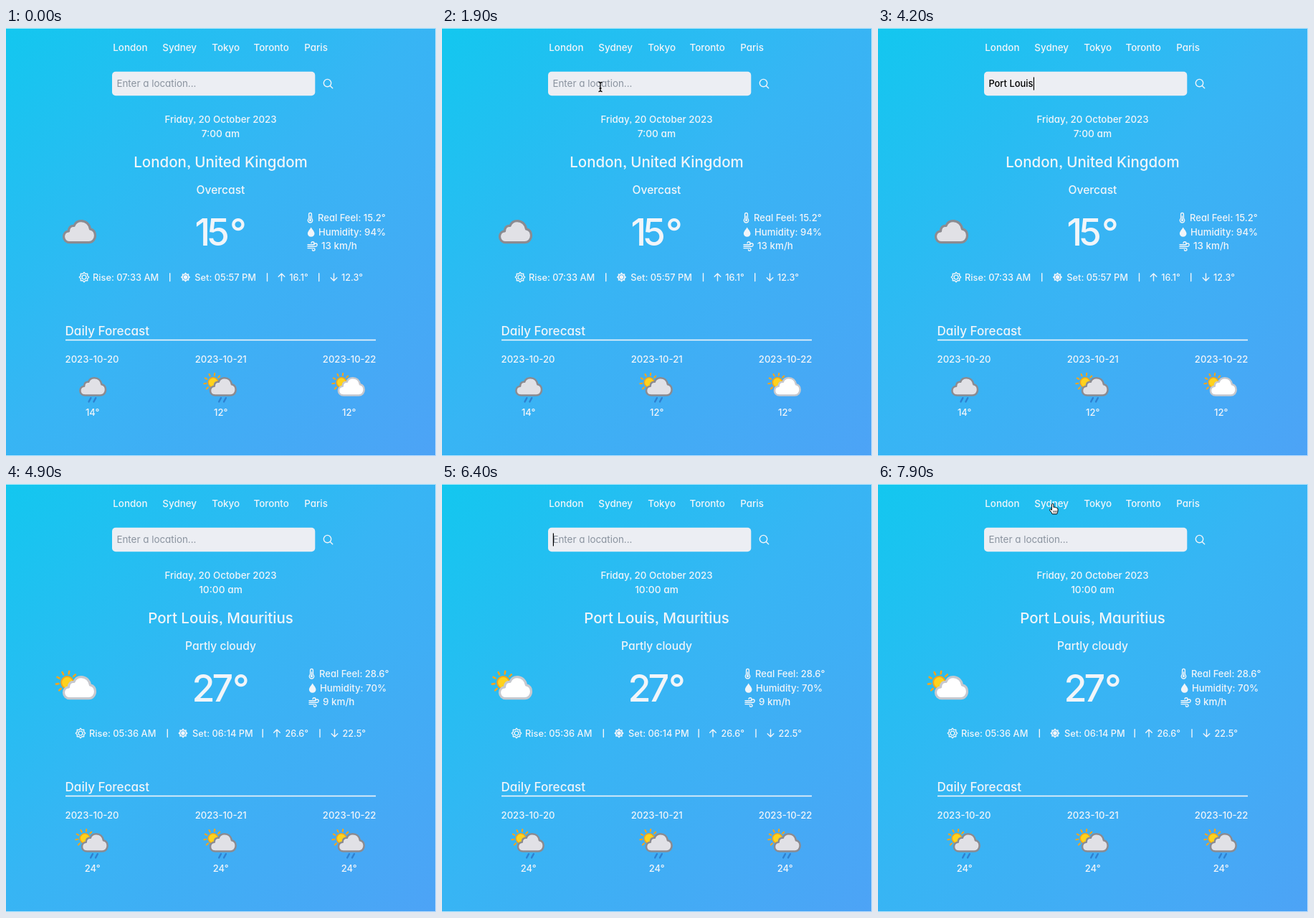
Write an HTML page that moves like this. It is 600 px wide and 596 px high and loops after 8000 ms.

```html
<!DOCTYPE html>
<html lang="en">
<head>
<meta charset="utf-8">
<title>Weather</title>
<style>
  html, body { margin: 0; width: 100%; height: 100%; overflow: hidden; }
  body { background: linear-gradient(135deg, #13c7ef, #37b5f4 48%, #4da3f6); }
  svg { display: block; width: 600px; height: 596px; }
  text {
    font: 500 13.4px Inter, "Open Sans", sans-serif;
    font-feature-settings: "cv11", "ss03";
    fill: #f1f5f9;
    white-space: pre;
  }
  .line { fill: none; stroke: #f1f5f9; stroke-width: 1.4; stroke-linecap: round; stroke-linejoin: round; }
  .solid { fill: #f1f5f9; }
  .cloud { stroke-width: 3.2; stroke-linejoin: round; }
  .grey { fill: #e1e1e6; stroke: #8b8b91; }
  .white { fill: #fff; stroke: #c6c8ce; }
  .rain { stroke: #2f80d0; stroke-width: 2.9; fill: none; stroke-linecap: round; }
  .disc { fill: #ffd21c; stroke: #f3a51f; stroke-width: 2; }
  .ray { stroke: #f3a51f; stroke-width: 2.6; stroke-linecap: round; }
  .edge { fill: none; stroke: #fff; stroke-opacity: .65; }
  #degrees text { font-weight: 400; }
  #hint { fill: #8a939f; font-weight: 400; }
  #typed { fill: #000; }
</style>
</head>
<body>
<svg id="stage" viewBox="0 0 600 596"></svg>
<script>
const LOOP = 8000;
const CLOUD = 'M8.5 30C3.5 30 0 26.5 0 22C0 17.5 3 14.5 7 14.2C7 9 10 6.5 14.5 6.8C16 2.5 20 0 24.5 0' +
  'C31 0 36 4.5 37 11.3C41.5 12.3 44 16 44 20.5C44 26 40 30 35 30Z';

const text = (x, y, s, size = 13.4, anchor = 'start', id = '') =>
  `<text x="${x}" y="${y}" style="font-size:${size}px" text-anchor="${anchor}"${id && ` id="${id}"`}>${s}</text>`;
const mid = (x, y, s, size) => text(x, y, s, size, 'middle');
const at = (x, y, body, scale = 1) => `<g transform="translate(${x} ${y}) scale(${scale})">${body}</g>`;
const path = (d, cls) => `<path class="${cls}" d="${d}"/>`;
const ring = (n, f) => Array.from({ length: n }, (_, i) => f(i)).join('');

// Weather icons
const sun = at(5, 7.8, ring(10, i =>
  `<path class="ray" d="M0-12.2V-15.8" transform="rotate(${i * 36 + 10})"/>`) +
  '<circle class="disc" r="8.4"/>');
const cloud = cls => path(CLOUD, 'cloud ' + cls);
const drops = path('M18.5 34.5L15 41M27 34.5L23.5 41', 'rain');
const ICONS = {
  overcast: cloud('grey'),
  partly: sun + cloud('white'),
  rain: cloud('grey') + drops,
  showers: sun + cloud('grey') + drops
};

// Small line icons
const star = 'M' + Array.from({ length: 16 }, (_, i) => {
  const a = i * Math.PI / 8, r = i % 2 ? 5 : 6.7;
  return (r * Math.sin(a)).toFixed(2) + ' ' + (-r * Math.cos(a)).toFixed(2);
}).join('L') + 'Z';
const rise = path(star, 'line') + '<circle class="line" r="2.9"/>';
const set = path(star, 'solid') + '<circle r="3.3" fill="none" stroke="#45b2f4" stroke-width=".9"/>';
const up = path('M0 5V-5M-4.3-.8L0-5L4.3-.8', 'line');
const down = path('M0-5V5M-4.3 .8L0 5L4.3 .8', 'line');
const thermo = path('M-1.9 1.2V-4.6A1.9 1.9 0 0 1 1.9-4.6V1.2A3.2 3.2 0 1 1-1.9 1.2Z', 'line') +
  path('M0-2V3', 'line') + '<circle class="solid" cy="3.6" r="1.6"/>';
const drop = path('M0-6.5C2 -3 4.8-.6 4.8 2.2A4.8 4.5 0 0 1-4.8 2.2C-4.8-.6-2-3 0-6.5Z', 'solid');
const wind = path('M-6-1.8H1A2 2 0 1 0-1-4M-6 .6H5A2.1 2.1 0 1 0 3-2M-6 3H2A1.8 1.8 0 1 1 .4 5', 'line');

function scene(w) {
  const [sunX, riseX, bar1, setIcon, setX, bar2, upX, hiX, bar3, downX, loX] = w.row;
  const icon = (name, i) => at((name === 'rain' ? 103.4 : 106) + 179 * i, 487.2, ICONS[name], .81);
  return mid(299.5, 152, w.time, 13.7) +
    mid(299.5, 194, w.place, 20.5) +
    mid(299.5, 231, w.sky, 15.6) +
    at(80.5, 268.6, ICONS[w.icon]) +
    `<g id="degrees">${text(w.tempX, 302.6, w.temp, 52)}</g>` +
    at(w.shift, 0,
      at(424.5, 264, thermo) + text(435, 268.8, 'Real Feel: ' + w.feel, 13) +
      at(425.7, 284, drop) + text(436, 288.8, 'Humidity: ' + w.humid, 13.2) +
      at(427, 303.6, wind) + text(440, 308.4, w.wind)) +
    at(sunX, 347, rise) + text(riseX, 351.8, 'Rise: ' + w.rise, 12.8) +
    at(setIcon, 347, set) + text(setX, 351.8, 'Set: ' + w.set, 12.8) +
    [bar1, bar2, bar3].map(x => path(`M${x} 341.8V352.6`, 'line')).join('') +
    at(upX, 347, up) + text(hiX, 351.8, w.hi, 12.6) +
    at(downX, 347, down) + text(loX, 351.8, w.lo, 12.6) +
    w.days.map(([name, t], i) => icon(name, i) + mid(120.7 + 179 * i, 539.6, t, 13)).join('');
}

const london = {
  time: '7:00 am', place: 'London, United Kingdom', sky: 'Overcast', icon: 'overcast',
  temp: '15°', tempX: '263.5 280.5 312', shift: 0, feel: '15.2°', humid: '94%', wind: '13 km/h',
  rise: '07:33 AM', set: '05:57 PM', hi: '16.1°', lo: '12.3°',
  row: [109, 121, 228.7, 250.5, 263.3, 364.5, 384.5, 395.3, 436.7, 457.5, 468],
  days: [['rain', '14°'], ['showers', '12°'], ['partly', '12°']]
};
const portLouis = {
  time: '10:00 am', place: 'Port Louis, Mauritius', sky: 'Partly cloudy', icon: 'partly',
  temp: '27°', tempX: '259.5 287.5 316', shift: 2, feel: '28.6°', humid: '70%', wind: '9 km/h',
  rise: '05:36 AM', set: '06:14 PM', hi: '26.6°', lo: '22.5°',
  row: [104, 116, 225.3, 247, 260, 358.2, 378, 389.5, 438, 458.5, 469.5],
  days: [['showers', '24°'], ['showers', '24°'], ['showers', '24°']]
};

const outline = 'fill="#fff" stroke="#000" stroke-linejoin="round"';
const pointers = {
  beam: '<path d="M-2.5-6.5Q0-6.5 0-4.5Q0-6.5 2.5-6.5M0-4.5V4.5M-2.5 6.5Q0 6.5 0 4.5Q0 6.5 2.5 6.5M-1.5 2H1.5" fill="none" stroke="#000" stroke-width="1.3"/>',
  arrow: `<path d="M0 0V13L3 10.2L5 14.8L7.2 13.8L5.2 9.4H9.2Z" ${outline}/>`,
  hand: `<path d="M-2.6 1V-5.2A1.3 1.3 0 0 1 0-5.2V-1.6Q1.3-2.5 2.3-1.2Q3.6-1.9 4.4-.6Q6-.9 6 .9V3Q6 5.4 4.6 7.8H-1.8Q-2.6 5.8-5.2 2.8Q-5.8 1.4-4.6 1Q-3.6 .8-2.6 2.4Z" ${outline}/><path d="M0 3V6M2 3V6M3.9 3V6" stroke="#000" stroke-width=".7"/>`
};

const $ = id => document.getElementById(id);
const nav = [['London', 149.3], ['Sydney', 218.3], ['Tokyo', 287.3], ['Toronto', 345.5], ['Paris', 416.2]];
$('stage').innerHTML =
  path('M0 .5H599.5V595.5H0', 'edge') +
  nav.map(([s, x]) => text(x, 32, s)).join('') +
  '<rect x="148" y="60.7" width="283.3" height="33.6" rx="5" fill="#eceef3"/>' +
  text(154.4, 82, 'Enter a location...', 13.4, 'start', 'hint') +
  text(154.4, 82, '', 12.9, 'start', 'typed') +
  '<rect id="caret" y="68.5" width="1.2" height="18"/>' +
  at(448.5, 76.6, '<circle class="line" r="5.2"/>' + path('M3.8 3.8L7.2 7.2', 'line')) +
  mid(299.5, 132, 'Friday, 20 October 2023', 13.35) +
  `<g id="before">${scene(london)}</g><g id="after">${scene(portLouis)}</g>`.replaceAll('id="degrees"', 'class="degrees"') +
  text(82.5, 428, 'Daily Forecast', 17.1) +
  '<rect class="solid" x="83" y="433.7" width="433" height="1.6"/>' +
  text(82.6, 466.4, '2023-10-20', 13.1) + mid(299.7, 466.4, '2023-10-21', 13.1) +
  text(516.4, 466.4, '2023-10-22', 13.1, 'end') +
  '<g id="pointer">' + Object.entries(pointers).map(([k, p]) => `<g id="${k}">${p}</g>`).join('') + '</g>';

const WORD = 'Port Louis';
const CLICK = 2000, TYPE = 2650, KEY = 150, ENTER = 4400, LOADED = 4700;
const moves = [
  { from: [209, -14], to: [221, 82], start: 1300, end: 1800, hide: TYPE },
  { from: [221, 82], to: [245, 34], start: 7200, end: 7700, hide: LOOP }
];
const show = (id, on) => $(id).setAttribute('visibility', on ? 'inherit' : 'hidden');
const group = (id, on) => $(id).setAttribute('display', on ? 'inline' : 'none');

function drawInput(t) {
  const count = t < TYPE || t >= ENTER ? 0 : Math.min(WORD.length, Math.floor((t - TYPE) / KEY) + 1);
  const typed = $('typed');
  typed.textContent = WORD.slice(0, count);
  show('hint', !count);
  const typing = t >= TYPE && t < TYPE + KEY * WORD.length + 500;
  const since = t >= ENTER ? t - ENTER : t - CLICK;
  show('caret', t >= CLICK && (typing || since % 1000 < 500));
  $('caret').setAttribute('x', 154.8 + (count ? typed.getComputedTextLength() : 0));
}

function drawPointer(t) {
  const m = moves.find(m => t >= m.start && t < m.hide);
  group('pointer', m);
  if (!m) return;
  const p = Math.min(1, (t - m.start) / (m.end - m.start));
  const e = p * p * (3 - 2 * p);
  const [x, y] = m.from.map((a, i) => a + (m.to[i] - a) * e);
  const kind = y > 61 && y < 94 ? 'beam' : y > 17 && y < 39 && x > 218 && x < 268 ? 'hand' : 'arrow';
  Object.keys(pointers).forEach(k => group(k, k === kind));
  $('pointer').setAttribute('transform', `translate(${x} ${y})`);
}

function frame() {
  const t = performance.now() % LOOP;
  group('before', t < LOADED);
  group('after', t >= LOADED);
  drawInput(t);
  drawPointer(t);
  requestAnimationFrame(frame);
}
frame();
</script>
</body>
</html>
```
